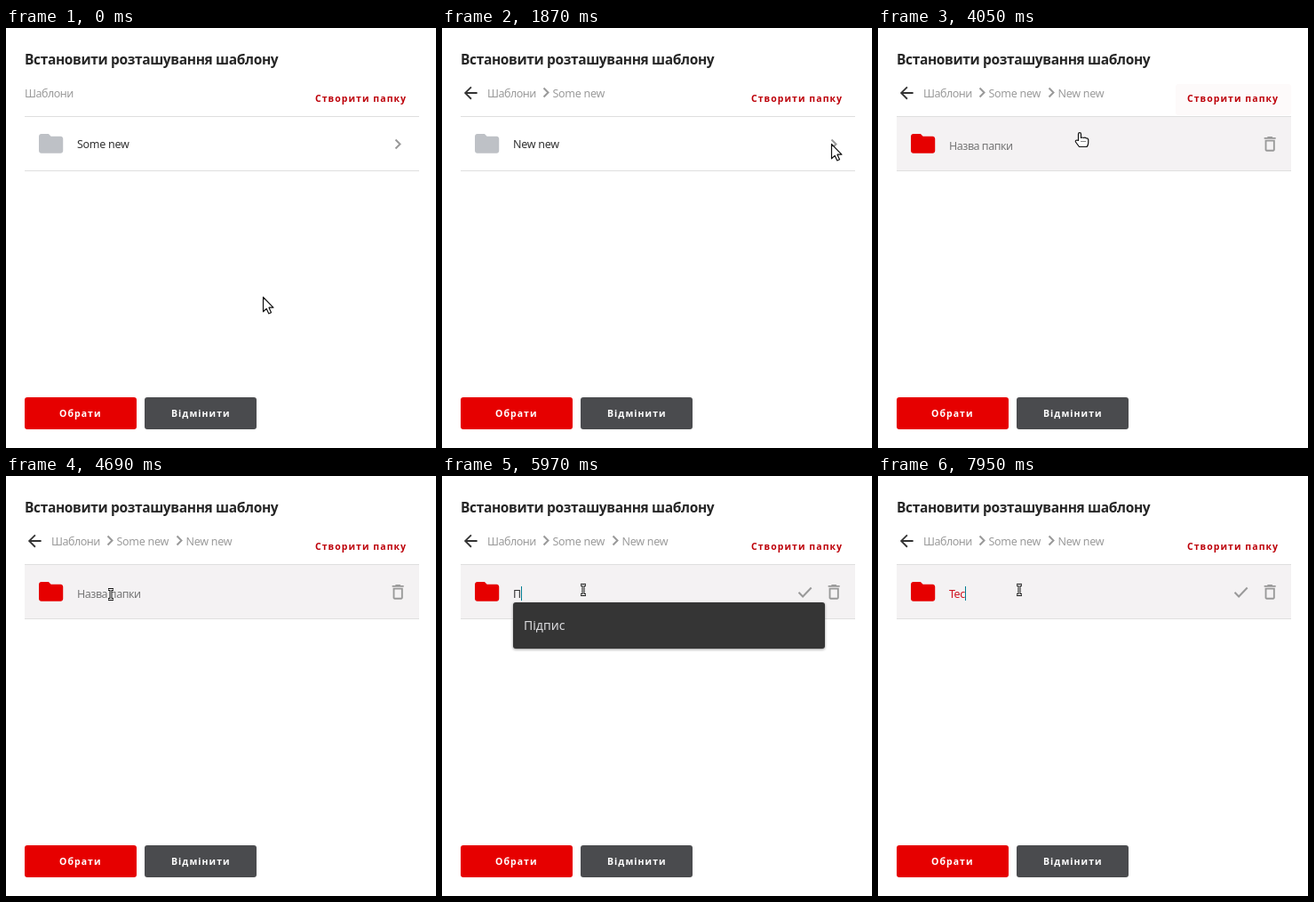
Write an HTML page that moves like this. It is 484 by 472 pixels and loops after 8000 ms.

```html
<!DOCTYPE html>
<html lang="uk">
<head>
<meta charset="utf-8">
<title>Встановити розташування шаблону</title>
<style>
  html, body { margin: 0; width: 100%; height: 100%; overflow: hidden; background: #fff; }
  svg { display: block; width: 484px; height: 472px; }
  text { font: 12.5px "Noto Sans", "Open Sans", sans-serif; letter-spacing: -.5px; white-space: pre; }
  .title { font-size: 15.5px; font-weight: 700; letter-spacing: -.35px; fill: #262626; }
  .latin { letter-spacing: -.28px; }
  .crumb { fill: #9b9b9b; }
  .button { font-size: 10.5px; font-weight: 700; letter-spacing: 1.05px; fill: #fff; }
  .create { fill: #bd0009; }
  .option { font-size: 14px; font-weight: 500; letter-spacing: 0; fill: #d9d9dc; }
  .stroke { fill: none; stroke: #999; stroke-width: 2; }
  .icon { fill: #999; }
  .rule { stroke: #dfdfdf; }
  .pointer { fill: #fff; stroke: #111; stroke-width: 1.2; stroke-linejoin: round; }
</style>
</head>
<body>
<svg viewBox="0 0 484 472">
  <defs>
    <filter id="shadow" x="-5%" y="-20%" width="110%" height="150%">
      <feDropShadow dx="0" dy="1" stdDeviation="1.5" flood-opacity=".4"/>
    </filter>
    <path id="chevron" class="stroke" d="M0 0l5 5-5 5"/>
  </defs>
  <rect width="484" height="472" fill="#fff"/>
  <text class="title" x="21" y="41">Встановити розташування шаблону</text>

  <path id="back" fill="#333" transform="translate(21.2 62) scale(.92)"
    d="M20 11H7.83l5.59-5.59L12 4l-8 8 8 8 1.41-1.41L7.83 13H20z"/>
  <text id="root" class="crumb" y="78">Шаблони</text>
  <g id="level1">
    <use href="#chevron" x="114.5" y="67.5"/>
    <text class="crumb latin" x="124.5" y="78">Some new</text>
  </g>
  <g id="level2">
    <use href="#chevron" x="192.5" y="67.5"/>
    <text class="crumb latin" x="202.5" y="78">New new</text>
  </g>

  <rect id="hover" x="335" y="63" width="130" height="35" rx="3" fill="#fdfafa"/>
  <text class="button create" x="348" y="83">Створити папку</text>

  <rect id="editBack" x="21" y="100" width="444" height="60" fill="#f4f2f3"/>
  <path class="rule" d="M21 99.5H465"/>
  <g id="row">
    <path class="rule" d="M21 160.5H465"/>
    <path id="folder" transform="translate(34.3 113.6) scale(1.36)"
      d="M10 4H4c-1.1 0-2 .9-2 2v12c0 1.1.9 2 2 2h16c1.1 0 2-.9 2-2V8c0-1.1-.9-2-2-2h-8z"/>
    <g id="entry">
      <text id="name" class="latin" x="80" y="135" fill="#333"></text>
      <use href="#chevron" x="438.5" y="125.5"/>
    </g>
    <g id="editor">
      <text id="field" x="80" y="137"></text>
      <path id="caret" stroke="#007c92" d="M.5 124V140"/>
      <path id="check" class="stroke" d="M401.5 130.8l4.6 4.7 9.6-10"/>
      <path class="icon" transform="translate(430 119.2) scale(.93)" fill-rule="evenodd"
        d="M6 19c0 1.1.9 2 2 2h8c1.1 0 2-.9 2-2V7H6zM8 9h8v10H8zM15.500 4l-1-1h-5l-1 1H5v2h14V4z"/>
    </g>
  </g>

  <g id="menu">
    <rect x="80" y="142" width="351" height="52" rx="3" fill="#353535" filter="url(#shadow)"/>
    <text class="option" x="92" y="173">Підпис</text>
  </g>

  <rect x="21" y="415" width="126" height="36" rx="3" fill="#e60000"/>
  <text class="button" x="60" y="437">Обрати</text>
  <rect x="156" y="415" width="126" height="36" rx="3" fill="#4a4b4e"/>
  <text class="button" x="186" y="437">Відмінити</text>

  <g id="cursor">
    <path id="arrow" class="pointer" d="M.5 .5V16.800L4.200 13.400 6.800 19 9.500 17.800 7 12.200H11.900Z"/>
    <g id="hand">
      <path class="pointer" d="M-1.500 8.500V1.200a1.500 1.500 0 0 1 3 0V5.500q1.500-1 3 0 1.500-.8 2.800.4 2.100-.3 2.400 1.500V11q0 2.500-1.700 4.500H-.5L-4.600 10q-.5-2 1.500-2Z"/>
      <path fill="none" stroke="#111" stroke-dasharray="1 1" d="M1.500 9.500h6"/>
    </g>
    <g id="beam" fill="none">
      <path id="beamShape" stroke="#111" stroke-width="3" d="M-3-5.500H3M-3 5.500H3M0-6V6"/>
      <path stroke="#fff" d="M-2.500-5.500H2.500M-2.500 5.500H2.500M0-5V5"/>
    </g>
  </g>
</svg>
<script>
const LOOP = 8000;
const ui = {};
for (const el of document.querySelectorAll('svg [id]')) ui[el.id] = el;

const T = { open: 1650, openDeep: 2720, create: 3620, focus: 4750, menu: 4850, type: 5700, menuEnd: 7260 };

// time, x, y of the pointer's hot spot
const path = [
  [50, 289, 302], [850, 404, 190], [1070, 413, 166], [1390, 438, 130],
  [3250, 438, 130], [3520, 398, 82], [3680, 398, 82], [4050, 227, 118],
  [4110, 227, 118], [4600, 118, 133], [4800, 118, 133], [5100, 113, 143],
  [5250, 113, 143], [5620, 159, 128]
];

const typed = [
  [T.type, 'П'], [6290, 'По'], [6670, 'Пос'], [6770, 'По'], [6990, 'П'],
  [7200, 'Т'], [7480, 'Те'], [7840, 'Тес']
];

const show = (el, on) => el.setAttribute('display', on ? 'inline' : 'none');
const ease = u => u * u * (3 - 2 * u);

function pointerAt(t) {
  const i = path.findIndex(p => p[0] > t);
  if (i === 0) return path[0].slice(1);
  if (i < 0) return path[path.length - 1].slice(1);
  const [t0, x0, y0] = path[i - 1], [t1, x1, y1] = path[i];
  const u = ease((t - t0) / (t1 - t0));
  return [x0 + (x1 - x0) * u, y0 + (y1 - y0) * u];
}

function pointerKind(t, x, y) {
  const onRow = y > 100 && y < 160;
  if (t < T.create) {
    const loading = t >= T.open && t < 2450 || t >= T.openDeep;
    return onRow && !loading || y < 97 && x > 335 ? 'hand' : 'arrow';
  }
  if (x > 80 && x < 390 && y > 122 && y < 142) return 'beam';
  return onRow && t < T.menu || y < 97 ? 'hand' : 'arrow';
}

function drawHeader(t) {
  show(ui.back, t >= T.open);
  ui.root.setAttribute('x', t < T.open ? 21 : 51);
  show(ui.level1, t >= T.open);
  show(ui.level2, t >= T.openDeep);
}

function drawRow(t) {
  const editing = t >= T.create;
  show(ui.row, editing || t < T.openDeep);
  show(ui.editBack, editing);
  show(ui.entry, !editing);
  show(ui.editor, editing);
  ui.folder.setAttribute('fill', editing ? '#e60000' : '#bec1c6');
  ui.name.textContent = t < T.open ? 'Some new' : 'New new';
  if (editing) drawField(t);
}

function drawField(t) {
  const focused = t >= T.focus;
  const value = typed.reduce((text, [at, next]) => t >= at ? next : text, '');
  const field = ui.field;
  field.textContent = value || 'Назва папки';
  const color = value ? (t < 7480 ? '#333' : '#cf1420') : focused ? '#007c92' : '#777';
  field.setAttribute('fill', color);
  const end = value ? Math.round(field.getComputedTextLength()) : 0;
  ui.caret.setAttribute('transform', `translate(${80 + end} 0)`);
  show(ui.caret, focused);
  show(ui.check, value);
}

function drawPointer(t) {
  const [x, y] = pointerAt(t);
  const kind = pointerKind(t, x, y);
  for (const k of ['arrow', 'hand', 'beam']) show(ui[k], k === kind);
  ui.cursor.setAttribute('transform', `translate(${x.toFixed(1)} ${y.toFixed(1)})`);
  show(ui.hover, t > 3400 && t < 4200);
}

function draw(t) {
  drawHeader(t);
  drawRow(t);
  show(ui.menu, t >= T.menu && t < T.menuEnd);
  drawPointer(t);
}

const start = performance.now();
function tick() {
  draw((performance.now() - start) % LOOP);
  requestAnimationFrame(tick);
}
tick();
</script>
</body>
</html>
```
